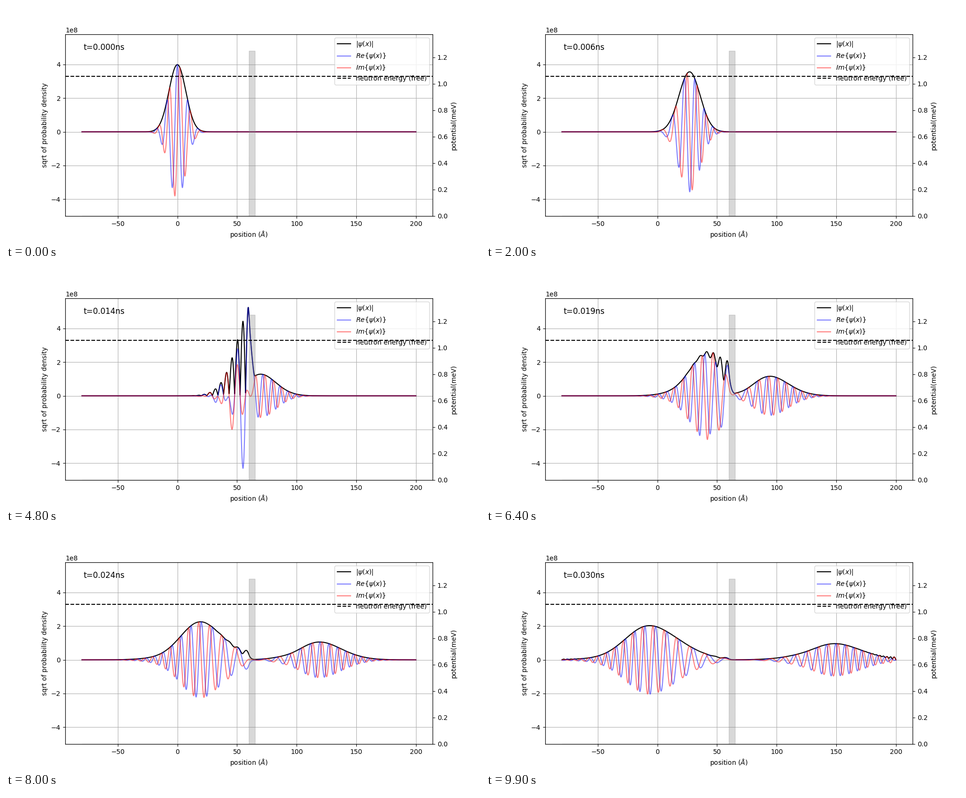
Animation, 1000 px wide and 500 px high, one loop 10 s. Source, as a matplotlib script:

```python
import numpy as np
import matplotlib.pyplot as plt
from matplotlib.animation import FuncAnimation

# Units: angstrom, picosecond, meV
HBAR = 0.6582120
HBAR_M = 6.29622            # hbar / neutron mass
SPEED = 4.5
DT = 0.3
FRAMES = 100
X0, X1 = -80.0, 200.0
WALL_A, WALL_B, WALL_V = 60.0, 65.0, 1.25
WIDTH = 10.0
PEAK = 1e9 / np.sqrt(2 * np.pi)

LENGTH = X1 - X0
MODES = 360
k0 = SPEED / HBAR_M
energy = 0.5 * HBAR * HBAR_M * k0 ** 2

x = np.linspace(X0, X1, 2801)
n = np.arange(1, MODES + 1)
kn = n * np.pi / LENGTH
basis = np.sqrt(2 / LENGTH) * np.sin(np.outer(x - X0, kn))


def cos_integral(j):
    """Integral of cos(j pi u / LENGTH) across the barrier."""
    q = j * np.pi / LENGTH
    safe = np.where(j == 0, 1, q)
    a, b = WALL_A - X0, WALL_B - X0
    return np.where(j == 0, b - a, (np.sin(safe * b) - np.sin(safe * a)) / safe)


# Hamiltonian of a hard-walled box with a square barrier, in the sine basis
barrier = WALL_V / LENGTH * (cos_integral(n[:, None] - n) - cos_integral(n[:, None] + n))
levels, vectors = np.linalg.eigh(np.diag(0.5 * HBAR * HBAR_M * kn ** 2) + barrier)
states = basis @ vectors

start = PEAK * np.exp(-(x / WIDTH) ** 2 + 1j * k0 * x)
coeffs = states.T @ start * (x[1] - x[0])


def wave(t):
    return states @ (coeffs * np.exp(-1j * levels * t / HBAR))


fig, ax = plt.subplots(figsize=(10, 5), dpi=100)
zero = np.zeros_like(x)
mod_line, = ax.plot(x, zero, "k", label=r"$|\psi(x)|$")
re_line, = ax.plot(x, zero, "b", alpha=0.5, label=r"$Re\{\psi(x)\}$")
im_line, = ax.plot(x, zero, "r", alpha=0.5, label=r"$Im\{\psi(x)\}$")
ax.set_ylim(-5e8, 5.79e8)
ax.set_xlabel(r"position ($\AA$)")
ax.set_ylabel("sqrt of probability density")
ax.grid()
clock = ax.text(0.05, 0.95, "", transform=ax.transAxes, fontsize=12, va="top")

ax2 = ax.twinx()
inside = (x >= WALL_A) & (x <= WALL_B)
ax2.fill_between(x, np.where(inside, WALL_V, 0), color="gray", alpha=0.3)
level = ax2.axhline(energy, color="k", ls="--", label="neutron energy (free)")
ax2.set_ylim(0, 1.1 * WALL_V)
ax2.set_ylabel("potential(meV)")
ax.legend(handles=[mod_line, re_line, im_line, level], loc="upper right")


def update(i):
    t = i * DT
    psi = wave(t)
    mod_line.set_ydata(np.abs(psi))
    re_line.set_ydata(psi.real)
    im_line.set_ydata(psi.imag)
    clock.set_text(f"t={t / 1000:.3f}ns")
    return mod_line, re_line, im_line, clock


anim = FuncAnimation(fig, update, frames=FRAMES, interval=100, repeat=True)
plt.show()
```
